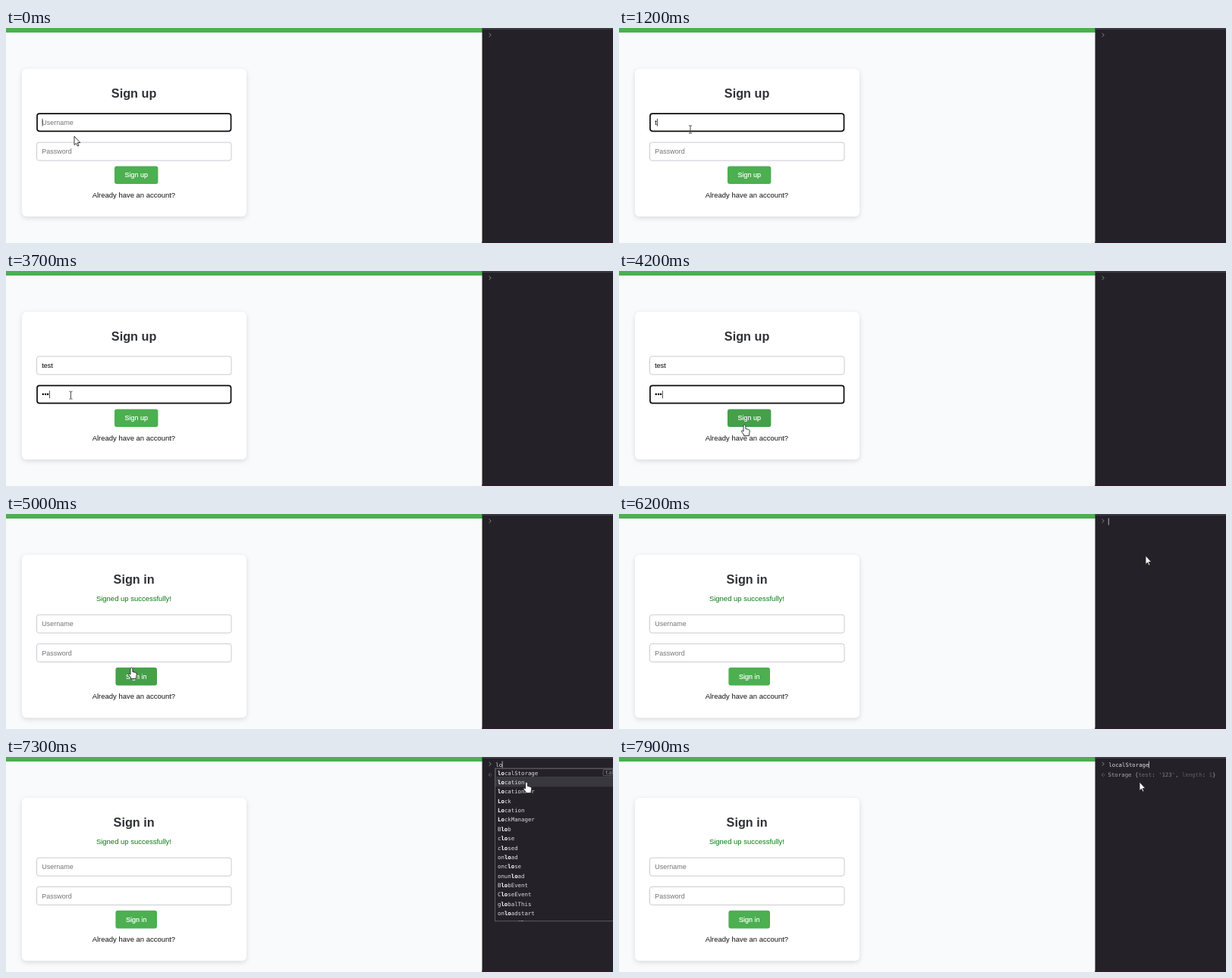
Recreate the animation shown at these times as an HTML page. Size 800x284 px, loop 8000 ms.

```html
<!DOCTYPE html>
<html lang="en">
<head>
<meta charset="utf-8">
<title>Sign up</title>
<style>
  html, body { margin: 0; width: 100%; height: 100%; overflow: hidden; background: #f8fafc; }
  svg { display: block; width: 100%; height: 100%; font: 9px "Liberation Sans", Arial, sans-serif; }
  text { white-space: pre; }
  .card { fill: #fff; filter: drop-shadow(0 2px 3px rgba(0, 0, 0, .13)); }
  .mid { text-anchor: middle; }
  .title { font-size: 16.23px; font-weight: bold; fill: #303236; }
  .body { font-size: 9.47px; }
  .hint { fill: #757575; }
  .mono { font: 7.36px "DejaVu Sans Mono", monospace; fill: #dcdce0; }
  .mono tspan { font-weight: bold; fill: #fff; }
  .label { fill: #fff; stroke: #fff; stroke-width: .2; }
</style>
</head>
<body>
<svg id="stage" viewBox="0 0 800 284"></svg>
<script>
const LOOP = 8000, STEP = 100;
const stage = document.getElementById('stage');

// Pointer stops: time, x, y
const stops = [
  [0, 90, 143], [200, 90, 143], [500, 94, 134], [1800, 94, 134], [2200, 88, 157.5],
  [2300, 88, 157.5], [2500, 79, 161], [3600, 79, 161], [4200, 165.5, 203],
  [5400, 165.5, 203], [6200, 694, 55], [6300, 686, 35], [6400, 686, 33]
];
const options = ('localStorage location locationbar Lock Location LockManager Blob close closed onload ' +
  'onclose onunload BlobEvent CloseEvent globalThis onloadstart customFloat').split(' ');

const shapes = {
  arrow: '<path d="M0 0V11.5L2.6 9.2 4.3 13 6 12.2 4.3 8.5H7.8Z" fill="#fff" stroke="#222" stroke-width=".9"/>',
  beam: '<path d="M-2-5H-.6L0-4.5 .6-5H2M0-4.5V4.5M-2 5H-.6L0 4.5 .6 5H2" fill="none" stroke="#444"/>',
  hand: '<path d="M-1.5 1.2Q0-1.2 1.4 1.2V5.5L5 6.3Q7 6.8 6.9 9L6 12.3V14.6H-1V13L-3.8 9.6Q-4.4 7.6-2.8 7.9L-1.5 9Z" fill="#fff" stroke="#222" stroke-width=".9"/>'
};

const rect = (x, y, w, h, fill, more = '') =>
  `<rect x="${x}" y="${y}" width="${w}" height="${h}" fill="${fill}" ${more}/>`;
const text = (x, y, str, cls = '', more = '') =>
  `<text x="${x}" y="${y}" class="${cls}" ${more}>${str}</text>`;
const line = (d, color, w = 1) =>
  `<path d="${d}" fill="none" stroke="${color}" stroke-width="${w}"/>`;

// Number of listed moments already passed
const passed = (t, times) => times.filter(at => t >= at).length;

function pointer(t) {
  const i = stops.findIndex(s => s[0] > t);
  if (i < 0) return stops[stops.length - 1].slice(1);
  const [t0, x0, y0] = stops[i - 1], [t1, x1, y1] = stops[i];
  const p = (t - t0) / (t1 - t0), e = p * p * (3 - 2 * p);
  return [x0 + (x1 - x0) * e, y0 + (y1 - y0) * e];
}

function field(y, value, hint, focus, advance) {
  const box = focus
    ? rect(41, y + .8, 255.5, 23.2, '#fff', 'rx="3.2" stroke="#0c0c10" stroke-width="1.7"')
    : rect(40.5, y + .5, 256.5, 24, '#fff', 'rx="3" stroke="#cacad4"');
  const caretX = 48 + advance;
  return box + text(47.3, y + 15.7, value || hint, value ? '' : 'hint') +
    (focus ? line(`M${caretX} ${y + 7.5}V${y + 17.5}`, '#222', .8) : '');
}

function form(t, hover) {
  const done = t >= 4700, dy = done ? 20.3 : 0, mode = done ? 'Sign in' : 'Sign up';
  const typed = 'test'.slice(0, passed(t, [1200, 1700, 1800, 1900]));
  const dots = passed(t, [3000, 3200, 3400]);
  const width = done ? 54.6 : 57.4;
  return rect(21, 54, 296, 195 + dy, '#fff', 'rx="6" class="card"') +
    text(168.6, 92.3, mode, 'mid title') +
    (done ? text(168.4, 114.6, 'Signed up successfully!', 'mid body', 'fill="#0b7a12"') : '') +
    field(112.3 + dy, done ? '' : typed, 'Username', !done && t < 2800, [0, 2.5, 7.5, 12, 14.5][typed.length]) +
    field(150.6 + dy, done ? '' : '•'.repeat(dots), 'Password', !done && t >= 2800, dots * 3.15) +
    rect(171.7 - width / 2, 182.4 + dy, width, 23.7, hover ? '#45a049' : '#4caf50', 'rx="3"') +
    text(171.7, 197.4 + dy, mode, 'mid label') +
    text(168.4, 224 + dy, 'Already have an account?', 'mid body', 'fill="#111"');
}

function popup() {
  const rows = options.map((word, i) =>
    text(648, 23.6 + i * 12.37, word.replace(/lo/i, '<tspan>$&</tspan>'), 'mono'));
  return rect(644.5, 15, 160, 201.7, '#242228', 'stroke="#5c5a62"') +
    rect(645, 27, 155, 12.3, '#3a383f') +
    rect(645.5, 15.5, 158, 11, 'none', 'stroke="#77757c" stroke-width=".7" stroke-dasharray="1 1"') +
    rect(787, 16.7, 20, 8, 'none', 'rx="1.5" stroke="#77757c" stroke-width=".7"') +
    text(789.5, 23.2, 'tab', 'mono', 'style="fill:#8d8b92"') +
    `<g clip-path="url(#list)">${rows.join('')}</g>`;
}

function panel(t, open) {
  const input = t >= 7800 ? 'localStorage' : 'lo'.slice(0, passed(t, [6900, 7000]));
  const caret = t >= 6200 && !(t >= 6700 && t < 6900);
  const caretX = 645.3 + input.length * 4.43;
  const dim = (str, color) => `<tspan style="font-weight:normal;fill:${color}">${str}</tspan>`;
  let out = rect(627.5, 0, 172.5, 284, '#242228') + rect(627.5, .6, 172.5, 1, '#56545b') +
    rect(627.5, 282, 172.5, 2, '#301d29') +
    line('M636.6 6.8L639.3 9.2 636.6 11.6', '#89878f', .9) +
    text(645.3, 12.6, input, 'mono');
  if (caret) out += line(`M${caretX} 5.5V14.5`, '#d8d8dc', .8);
  if (t >= 7000) out += line('M638.6 21.4L636 23.6 638.6 25.8', '#77757d', .8) +
    '<circle cx="639.6" cy="23.6" r=".6" fill="#77757d"/>';
  if (t >= 7800) out += text(644.5, 26.2, dim('Storage {', '#a3a1a8') + dim('test', '#706a7c') +
    dim(': ', '#8f8d94') + dim("'123'", '#858389') + dim(', ', '#8f8d94') + dim('length', '#615d69') +
    dim(': ', '#8f8d94') + dim('1', '#66636f') + dim('}', '#a3a1a8'), 'mono');
  return out + (open ? popup() : '');
}

function draw(t) {
  const [x, y] = pointer(t), open = t >= 7000 && t < 7800;
  const inside = (l, top, r, b) => x > l && x < r && y > top && y < b;
  const onButton = t < 4700 ? inside(143, 182, 200, 206) : inside(144, 202, 199, 226);
  const onField = t < 4700 && (inside(40, 112, 297, 137) || inside(40, 151, 297, 175));
  const kind = onButton || open ? 'hand' : onField ? 'beam' : 'arrow';
  stage.innerHTML = '<clipPath id="list"><rect x="645" y="15" width="155" height="201.7"/></clipPath>' +
    rect(0, 0, 800, 284, '#f8fafc') + rect(0, 0, 628, 6, '#4caf50') +
    form(t, onButton) + panel(t, open) +
    `<g transform="translate(${x} ${y})">${shapes[kind]}</g>`;
}

let shown = -1;
const start = performance.now();
function tick() {
  const t = Math.floor((performance.now() - start) % LOOP / STEP) * STEP;
  if (t !== shown) draw(shown = t);
  requestAnimationFrame(tick);
}
tick();
</script>
</body>
</html>
```
